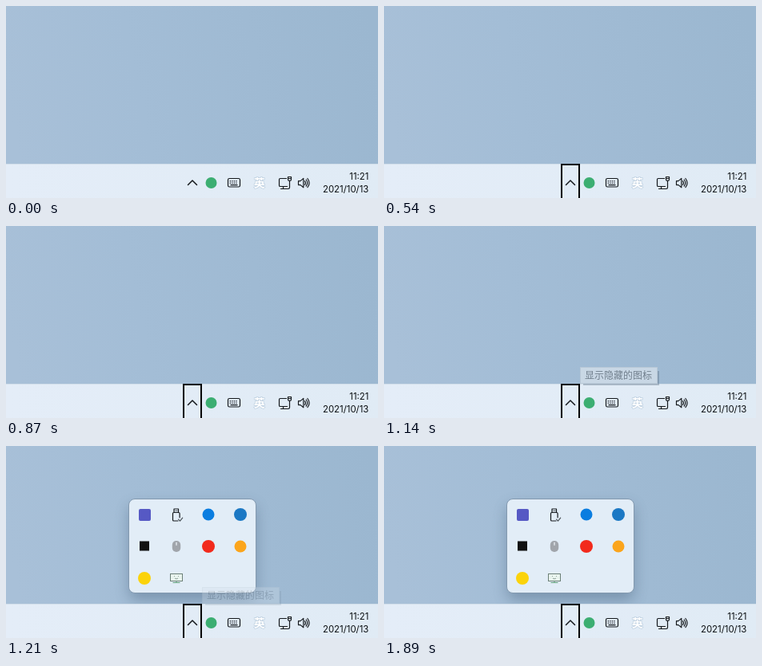
Animation of 465x241 px, one loop 2290 ms. Source, as an HTML page:

```html
<!DOCTYPE html>
<html lang="zh">
<head>
<meta charset="utf-8">
<title>Taskbar overflow menu</title>
<style>
html, body { margin: 0; width: 100%; height: 100%; overflow: hidden; background: #a2bcd4; }
svg { display: block; width: 465px; height: 241px; }
.line { fill: none; stroke: #15191d; stroke-width: 1.2; stroke-linecap: round; stroke-linejoin: round; }
.clock { font: 11.4px Inter, "Open Sans", sans-serif; text-anchor: end; fill: #0c1013; }
.cjk { font-family: "Noto Sans CJK SC", "Noto Sans CJK", sans-serif; }
.focus, .flyout, .tip { animation: 2290ms step-end infinite; }
.focus { animation-name: focus; }
.flyout { animation-name: flyout; }
.tip { animation-name: tip; }
@keyframes focus { 0% { opacity: 0 } 23.581%, 100% { opacity: 1 } }
@keyframes flyout { 0% { opacity: 0 } 52.838%, 100% { opacity: 1 } }
@keyframes tip {
  0% { opacity: 0 }
  47.598% { opacity: .3 }
  49.782% { opacity: .8 }
  52.838% { opacity: .3 }
  55.895%, 100% { opacity: 0 }
}
</style>
</head>
<body>
<svg viewBox="0 0 465 241">
  <defs>
    <linearGradient id="sky" gradientUnits="userSpaceOnUse" x1="0" y1="110" x2="455" y2="20">
      <stop offset="0" stop-color="#a8c0d8"/>
      <stop offset=".35" stop-color="#a3bdd6"/>
      <stop offset="1" stop-color="#9bb7d0"/>
    </linearGradient>
    <linearGradient id="bar">
      <stop offset="0" stop-color="#e4edf8"/>
      <stop offset="1" stop-color="#e0ebf5"/>
    </linearGradient>
    <filter id="soft" x="-40%" y="-40%" width="180%" height="180%">
      <feGaussianBlur stdDeviation="9"/>
    </filter>
    <clipPath id="desktop"><rect width="465" height="198"/></clipPath>
  </defs>

  <rect width="465" height="241" fill="url(#sky)"/>
  <rect y="198" width="465" height="43" fill="url(#bar)"/>
  <rect y="198" width="465" height="1" fill="#d3dfea"/>

  <!-- Tray -->
  <g class="line">
    <path d="M227.5 224.5 233 219 238.5 224.5" stroke-width="1.5"/>
    <rect x="277.5" y="216.5" width="15" height="10.5" rx="1.8"/>
    <path d="M280.3 219.7h10M280.3 222.2h10" stroke-width="1.4" stroke-dasharray=".1 2.4"/>
    <path d="M281 224.7h8"/>
  </g>
  <circle cx="256.5" cy="222" r="7" fill="#3cae72"/>
  <text class="cjk" x="309.8" y="227.3" font-size="14" font-weight="700" fill="#fff" stroke="#bdcfe0" stroke-width="1.3" paint-order="stroke">英</text>
  <g class="line">
    <path d="M350.5 216.5h-7.7q-1.3 0-1.3 1.3v7.4q0 1.3 1.3 1.3h8.7M346.5 226.5v3M343.5 229.5h9.3q1.7 0 1.7-1.7V220"/>
    <path d="M352.5 214.5h4v3.2q0 1.6-2 1.6t-2-1.6zM352.5 216.5h4"/>
    <path d="M365.5 219.6h2.5l3.8-3.2v11.4l-3.8-3.2h-2.5zM373.5 219.7q1.8 2.4 0 4.8M375.2 218q3.2 4.1 0 8.2M376.9 216.5q4.4 5.6 0 11.2"/>
  </g>
  <text class="clock" x="453.4" y="218">11:21</text>
  <text class="clock" x="453.4" y="234">2021/10/13</text>

  <rect class="focus" x="222" y="199" width="22" height="44" fill="none" stroke="#000" stroke-width="2"/>

  <g class="flyout">
    <g clip-path="url(#desktop)">
      <rect x="154" y="75" width="158" height="118" rx="8" fill="#405a75" opacity=".42" filter="url(#soft)"/>
    </g>
    <rect x="153.5" y="66.5" width="159" height="118" rx="7.5" fill="#e2edf7" stroke="#8399af"/>
    <rect x="166" y="79" width="15" height="15" rx="2" fill="#5659c4"/>
    <g class="line">
      <path d="M210 83.5v-4.5h5.5v4.5M212 81.3h.1M213.8 81.3h.1M215 94h-5.2q-1.3 0-1.3-1.3v-7.9q0-1.3 1.3-1.3h6q1.3 0 1.3 1.3v5"/>
      <path d="M215.5 92.2l2 2 3.2-4" stroke="#4b5258"/>
    </g>
    <circle cx="253" cy="86" r="7.5" fill="#0a7de0"/>
    <circle cx="293" cy="86" r="8" fill="#1b78c4"/>
    <rect x="167" y="119.5" width="12" height="12" fill="#111"/>
    <rect x="207.8" y="119" width="10.4" height="14" rx="5" fill="#a1a5ab"/>
    <path d="M213 121.3v3" stroke="#e8edf2" stroke-width="1.3" stroke-linecap="round"/>
    <circle cx="253" cy="126" r="8" fill="#f22a1c"/>
    <circle cx="293" cy="126" r="7.5" fill="#fba51c"/>
    <circle cx="173" cy="166" r="8" fill="#fbd30b"/>
    <g fill="none" stroke="#6b7f76">
      <rect x="205.5" y="160.5" width="15" height="9" fill="#e9f4ee"/>
      <path d="M213 169.5v2.5M208.5 171.5h9" stroke="#62a07a"/>
      <path d="M210.5 163v1M215.5 163v1M211 166.2q2 1.2 4 0" stroke-width=".7"/>
    </g>
  </g>

  <g class="tip">
    <rect x="249" y="182" width="95" height="18" fill="#5e7285" opacity=".5"/>
    <rect x="245.5" y="177.5" width="96" height="20" fill="#d3dfea" stroke="#c0cdd9"/>
    <text class="cjk" x="251" y="192.3" font-size="12" fill="#66717c">显示隐藏的图标</text>
  </g>
</svg>
</body>
</html>
```
